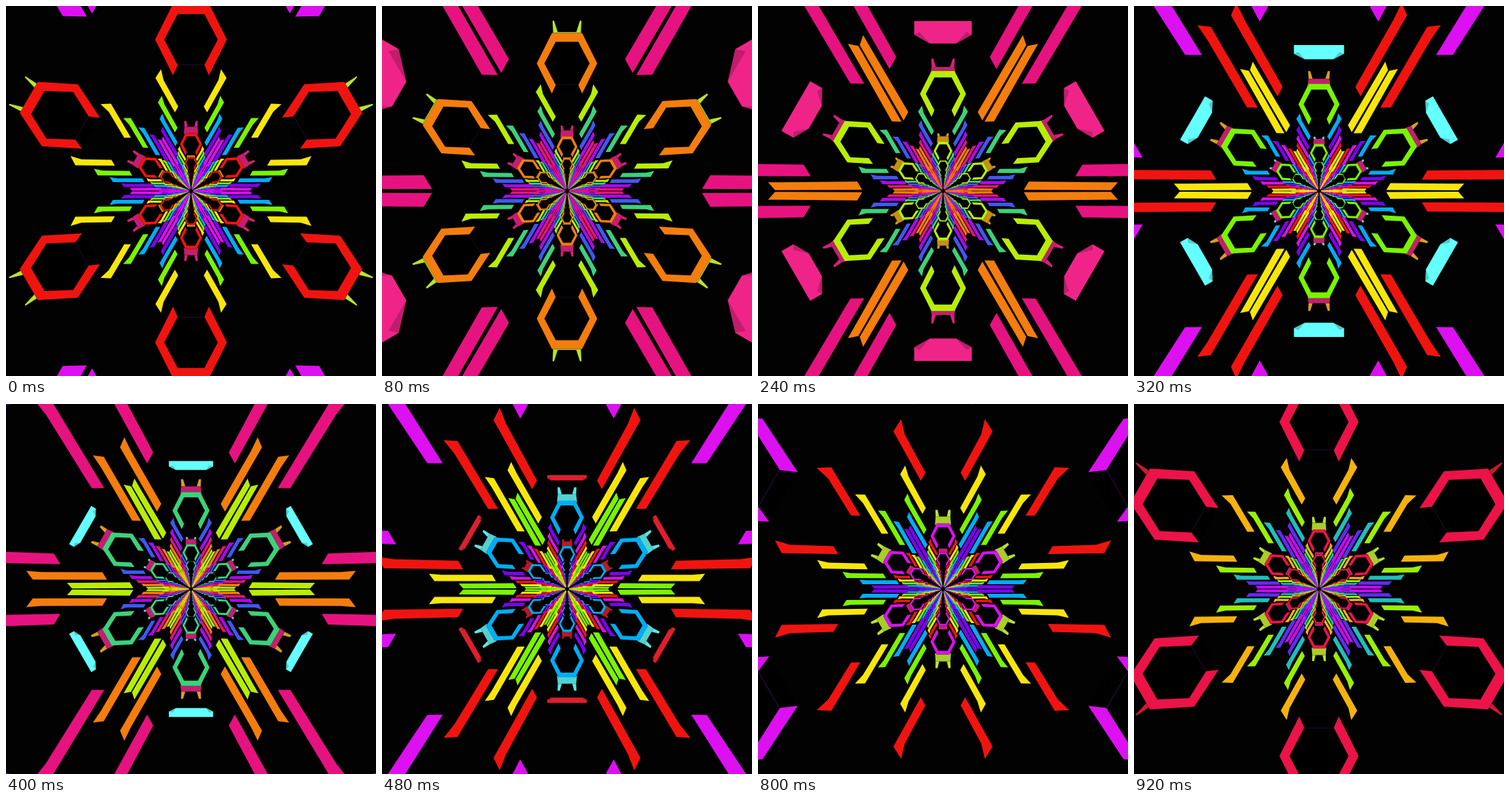
Recreate the animation shown at these times as an HTML page. Size 540 px wide and 540 px high, loop 0.96 s.

```html
<!DOCTYPE html>
<html lang="en">
<head>
<meta charset="utf-8">
<title>Neon tunnel</title>
<style>
  html, body { margin: 0; width: 100%; height: 100%; overflow: hidden; background: #020202; }
  svg { display: block; width: 100vw; height: 100vh; }
</style>
</head>
<body>
<svg viewBox="-270 -270 540 540">
  <defs><g id="wedge"></g></defs>
  <g id="star"></g>
</svg>
<script>
// Rings recede at a steady speed; every sixth one is a hexagon, the rest are bars.
const FRAME = 40, FRAMES = 24, RINGS = 110, NEAR = 0.447, CENTRE = 98.8;
const RAINBOW = ['f01410', 'f7e60c', '7af400', '00adf6', '7f00f0', 'dc10f0'];
const FLASH = ['cdfb32', 'f02488', 'f0b020', '64ffff', 'e01e2d'];

const wedge = document.getElementById('wedge');
document.getElementById('star').innerHTML = [0, 60, 120, 180, 240, 300]
  .map(a => `<use href="#wedge" transform="rotate(${a})"/>`).join('');

const mod = (a, b) => ((a % b) + b) % b;
const clamp = x => Math.max(0, Math.min(1, x));
const flip = pts => pts.map(([x, y]) => [-x, y]);
const fromSeam = ([u, v]) => [0.5 * u - 0.866 * v, 0.866 * u + 0.5 * v];
const channels = hex => [0, 2, 4].map(i => parseInt(hex.slice(i, i + 2), 16));

function mix(a, b, f) {
  const to = channels(b);
  return `rgb(${channels(a).map((c, i) => Math.round(c + (to[i] - c) * f))})`;
}
function rainbow(s) {
  const i = Math.floor(s);
  return mix(RAINBOW[mod(i, 6)], RAINBOW[mod(i + 1, 6)], s - i);
}
const flash = (step, shade) => mix(FLASH[mod(step, 5)], '000000', shade);

function outline(pts, z) {
  return 'M' + pts.map(([x, y]) => (x / z).toFixed(2) + ' ' + (-y / z).toFixed(2)).join('L') + 'Z';
}
function shape(fill, z, ...polys) {
  return `<path fill="${fill}" d="${polys.map(p => outline(p, z)).join('')}"/>`;
}
function both(fill, z, pts) {
  return shape(fill, z, pts, flip(pts));
}

// Six corners, from lower left clockwise
function corners(r, stretch) {
  return [240, 180, 120, 60, 0, -60].map(deg => {
    const a = deg * Math.PI / 180;
    return [r * Math.cos(a), CENTRE + r * stretch * Math.sin(a)];
  });
}
const OUTER = corners(23.4, 1.155);
const INNER = corners(17.5, 1.1).reverse();

function panel(z, step) {
  const depth = 0.108 - 0.19 * (z - 0.614);
  if (depth <= 0 || z < 0.45) return '';
  const m = z / (z - depth), top = 150 * m, side = 150 + (m - 1) * 58;
  const w = 26 + 4 * clamp((1.1 - z) / 0.5);
  const b = 11 + 14 * clamp((z - 0.63) / 0.4);
  const body = [[-w, top], [w, top], [w, side], [b, 150], [-b, 150], [-w, side]];
  const corner = [[w, side], [b, 150], [w * 0.82, side + (m - 1) * 20]];
  return shape(flash(step === 1 ? step : step + 1, 0), z, body) + both('rgba(0,0,0,.2)', z, corner);
}

function neck(z, step) {
  const g = clamp((z - NEAR) / 0.75), far = clamp((z - 1.45) * 3);
  const tip = 131 + 17 * g ** 1.4 - 7 * far, notch = 121.5 + 14 * g;
  const w = 10.8 + 3.4 * g;
  const spike = [[w - 0.4, notch], [w, tip], [w - 0.8 - 3.4 * g, tip], [7.2, notch]];
  const body = [[-w - 0.8, 120], [-w + 0.4, notch], [w - 0.4, notch], [w + 0.8, 120]];
  return both(flash(step, 0.1), z, spike) +
    shape(flash(mod(step, 6) === 2 ? 1 : step, 0.18), z, body);
}

function hexagon(z, s) {
  const step = Math.floor(s), [x, y] = INNER[0];
  const sill = [[x, y], [-x, y], [-x, y + 0.4], [x, y + 0.4]];
  return panel(z, step) + neck(z, step) +
    shape('#000', z, OUTER) +
    shape(rainbow(s), z, OUTER.concat(INNER)) +
    shape('#260a30', z, sill);
}

// A bar lies along the seam between wedges; its two ends sit at different depths.
function bar(z, k, fill) {
  const far = z - 0.025 * k, near = z - 0.0046 * k * k;
  if (Math.min(far, near) < 0.06) return '';
  const end = 103.5, tip = 68.5 - 0.78 * k * k;
  const rim = 36.2 - 6.2 * k;
  const back = [[end * 0.96, 27.5 - 5.4 * k], [end, rim], [end * 0.91, rim - 0.7 * (5 - k)]];
  const front = [[tip + 3, 33.2 - 5.5 * k], [tip, 28 - 5.45 * k]];
  const at = depth => ([u, v]) => fromSeam([u / depth, v / depth]);
  return both(fill, 1, back.map(at(far)).concat(front.map(at(near))));
}

function ring(n, frame) {
  const s = n + frame / 4, z = NEAR + s / 6, kind = mod(n, 6);
  if (kind) return bar(z, kind, rainbow(s));
  return z > 0.1 ? hexagon(z, s) : '';
}

function draw(frame) {
  let out = '';
  for (let n = RINGS; n >= -9; n--) out += ring(n, frame);
  wedge.innerHTML = out;
}

let shown = -1;
function tick() {
  const frame = Math.floor(performance.now() / FRAME) % FRAMES;
  if (frame !== shown) draw(shown = frame);
  requestAnimationFrame(tick);
}
tick();
</script>
</body>
</html>
```
